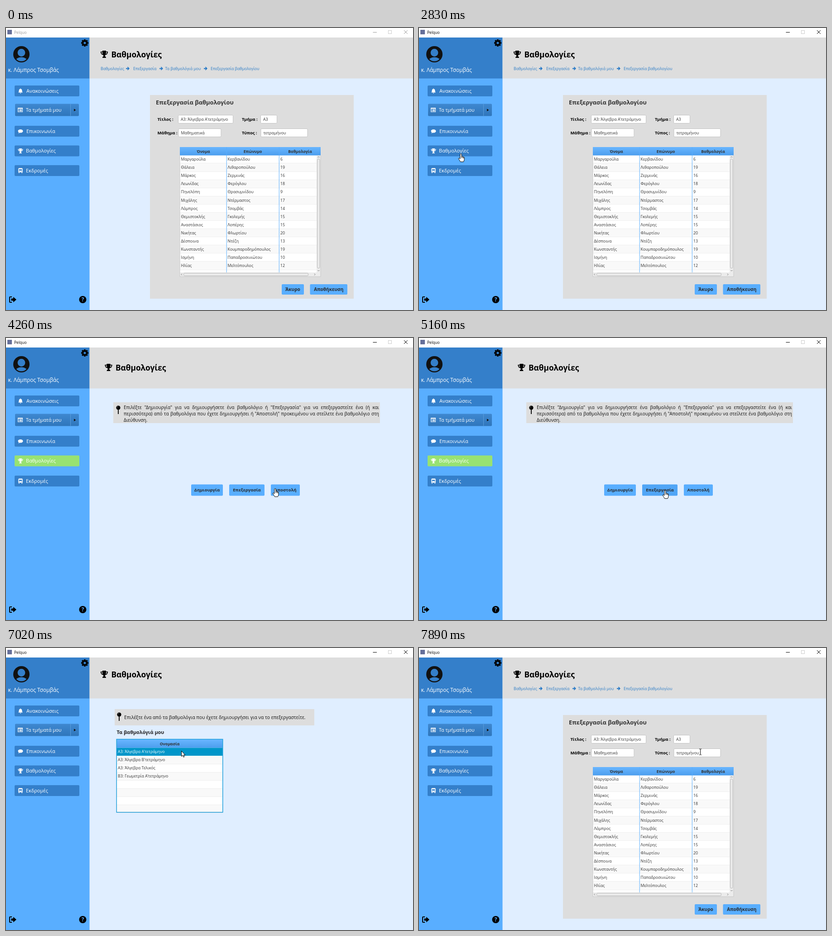
These frames come from a looping animation (899x623 px, 7.99 s). An HTML page with a canvas:

```html
<!DOCTYPE html>
<html lang="el">
<head>
<meta charset="utf-8">
<title>Βαθμολογίες</title>
<style>
html, body { margin: 0; width: 100%; height: 100%; overflow: hidden; background: #e0eeff; }
canvas { display: block; }
</style>
</head>
<body>
<canvas id="stage" width="899" height="623"></canvas>
<script>
const ctx = document.getElementById('stage').getContext('2d');
const LOOP = 7990;
const FONT = '"Open Sans", "Noto Sans", sans-serif';
const BLUE = '#59aeff', DEEP = '#347fca', GREY = '#dddddd', INK = '#333333';

const ICONS = {
  trophy: 'M4 0H12V2H16V4Q15 9 10.6 9.6Q9.5 11 9.5 12.5Q12 13 12 16H4Q4 13 6.5 12.5Q6.5 11 5.4 9.6Q1 9 0 4V2H4ZM1.6 3.5Q2 6.8 4.7 7.8Q4 6 4 3.5ZM14.4 3.5Q14 6.8 11.3 7.8Q12 6 12 3.5Z',
  bell: 'M8 0Q9 0 9 1.5Q13 2.5 13 7Q13 11 15 13H1Q3 11 3 7Q3 2.5 7 1.5Q7 0 8 0ZM6 14H10Q10 16 8 16Q6 16 6 14Z',
  list: 'M0 1H16V15H0ZM1.5 4.5V13.5H14.5V4.5ZM3 6H4.5V7.5H3ZM6 6H13V7.5H6ZM3 8.5H4.5V10H3ZM6 8.5H13V10H6ZM3 11H4.5V12.5H3ZM6 11H13V12.5H6Z',
  comment: 'M8 2C12.5 2 16 4.5 16 7.5S12.5 13 8 13Q6.5 13 5.2 12.6Q3.5 14.5 1 14.5Q2.5 13 2.6 11.4Q0 9.8 0 7.5C0 4.5 3.5 2 8 2Z',
  bus: 'M3 0H13Q15 1 15 4V13H14V16H11.5V13.5H4.5V16H2V13H1V4Q1 1 3 0ZM3 4V8H13V4ZM3 10V12H5.5V10ZM10.5 10V12H13V10Z',
  next: 'M8 1L15 8L8 15L6 13L9 10H1V6H9L6 3Z',
  exit: 'M6 1H2Q0 1 0 3V13Q0 15 2 15H6V13H2V3H6ZM9 2L16 8L9 14V10.5H4.5V5.5H9Z'
};
for (const name in ICONS) ICONS[name] = new Path2D(ICONS[name]);

const ARROW = new Path2D('M.5 .5V12.5L3.2 10L5.1 14.2L7 13.3L5.2 9.3H8.8Z');
const HAND = new Path2D('M-1.6 11.5V1.6Q-1.6 .4 0 .4T1.6 1.6V6.2Q3.5 5.4 4.2 6.9Q5.7 6.4 6.2 7.7Q7.5 7.5 7.5 9V13Q7.3 15.5 5.8 18.2H-1Q-2.5 15-5 11.6Q-5.4 9.8-3.8 9.7Z');
const KNUCKLES = new Path2D('M1.6 6V10M4.2 7V10M6.2 8V10.5');
const BEAM = new Path2D('M-2.5 -6.5H-.8L0 -5.8L.8 -6.5H2.5M0 -5.8V5.8M-2.5 6.5H-.8L0 5.8L.8 6.5H2.5');

const MENU = [
  ['Ανακοινώσεις', 'bell', 45, 127],
  ['Επικοινωνία', 'comment', 45, 216],
  ['Βαθμολογίες', 'trophy', 44, 259.5],
  ['Εκδρομές', 'bus', 44, 303]
];
const ACTIONS = [['Δημιουργία', 409, 70], ['Επεξεργασία', 493, 78], ['Αποστολή', 585, 64]];
const FIELDS = [
  ['Τίτλος :', 334.5, 380, 192, 122, "Α3: Άλγεβρα Α'τετράμηνο"],
  ['Τμήμα :', 521, 562, 192, 37, 'Α3'],
  ['Μάθημα :', 334.5, 380.5, 222, 95, 'Μαθηματικά'],
  ['Τύπος :', 521, 562.5, 222, 104, 'τετραμήνου']
];
const PUPILS = `Μαργαρούλα Κερβανίδου 6
Θάλεια Λιθαροπούλου 19
Μάρκος Ζερμινάς 16
Λεωνίδας Φερόγλου 18
Πηνελόπη Θρασυμνίδου 9
Μιχάλης Ντέρμαστος 17
Λάμπρος Τσομβάς 14
Θεμιστοκλής Γκολεμής 15
Αναστάσιος Λοπέρης 15
Νικήτας Φλωρτίου 20
Δέσποινα Ντέζη 13
Κωνσταντής Κουμπαροδημόπουλος 19
Ισμήνη Παπαδροσινιώτου 10
Ηλίας Μελτόπουλος 12`.split('\n').map(line => line.split(' '));
const BOOKS = ["Α3: Άλγεβρα Α'τετράμηνο", "Α3: Άλγεβρα Β'τετράμηνο", 'Α3: Άλγεβρα Τελικός', "Β3: Γεωμετρία Α'τετράμηνο"];
const HINT = [
  'Επιλέξτε "Δημιουργία" για να δημιουργήσετε ένα βαθμολόγιο ή "Επεξεργασία" για να επεξεργαστείτε ένα (ή και',
  'περισσότερα) από τα βαθμολόγια που έχετε δημιουργήσει ή "Αποστολή" προκειμένου να στείλετε ένα βαθμολόγιο στη',
  'Διεύθυνση.'
];
const ROW = 18.08;

// Pointer moves: first step, last step, step count, end point
const MOVES = [
  [540, 540, 1, 614, 535], [650, 1190, 6, 73, 216], [1300, 1300, 1, 89, 270], [1410, 1410, 1, 92, 277],
  [3600, 4260, 7, 594, 332], [4380, 4380, 1, 607, 334], [4480, 4480, 1, 613, 336], [4590, 5160, 6, 543, 336],
  [5800, 6470, 7, 375, 229], [6580, 6580, 1, 385, 228], [6680, 6680, 1, 387, 227],
  [7350, 7570, 3, 500, 242], [7670, 7890, 3, 621, 230]
];

function rect(x, y, w, h, color) {
  ctx.fillStyle = color;
  ctx.fillRect(x, y, w, h);
}

function box(x, y, w, h, fill, radius = 2, line) {
  ctx.beginPath();
  ctx.roundRect(x, y, w, h, radius);
  ctx.fillStyle = fill;
  ctx.fill();
  if (line) {
    ctx.strokeStyle = line;
    ctx.lineWidth = 1;
    ctx.stroke();
  }
}

function disc(x, y, r, color) {
  ctx.beginPath();
  ctx.arc(x, y, r, 0, Math.PI * 2);
  ctx.fillStyle = color;
  ctx.fill();
}

function line(points, color, width = 1) {
  ctx.beginPath();
  points.forEach(([x, y]) => ctx.lineTo(x, y));
  ctx.strokeStyle = color;
  ctx.lineWidth = width;
  ctx.stroke();
}

function shade(y, h, top, bottom) {
  const g = ctx.createLinearGradient(0, y, 0, y + h);
  g.addColorStop(0, top);
  g.addColorStop(1, bottom);
  return g;
}

// y is the middle of the capitals
function text(str, x, y, size, color = INK, bold = false, align = 'left') {
  ctx.font = `${bold ? 700 : 400} ${size}px ${FONT}`;
  ctx.fillStyle = color;
  ctx.textAlign = align;
  ctx.fillText(str, x, y + size * 0.36);
}

function justified(str, x, y, size, width) {
  ctx.font = `400 ${size}px ${FONT}`;
  const words = str.split(' ');
  const widths = words.map(w => ctx.measureText(w).width);
  const gap = (width - widths.reduce((a, b) => a + b)) / (words.length - 1);
  words.forEach((word, i) => {
    text(word, x, y, size, '#111');
    x += widths[i] + gap;
  });
}

function icon(name, cx, cy, size, color) {
  ctx.save();
  ctx.translate(cx - size / 2, cy - size / 2);
  ctx.scale(size / 16, size / 16);
  ctx.fillStyle = color;
  ctx.fill(ICONS[name], 'evenodd');
  ctx.restore();
}

function button(label, x, y, w, h, size, fill = BLUE) {
  box(x, y, w, h, fill);
  text(label, x + w / 2, y + h / 2, size, '#2b2b2b', true, 'center');
}

function pin(x, y) {
  rect(x - 1, y, 2, 14, '#111');
  disc(x, y, 4.6, '#000');
  disc(x - 1.5, y - 1.7, 1, '#777');
}

function chevron(x, y, dx, dy) {
  line([[x - dx - 2 * dy, y - dy - 2 * dx], [x + dx, y + dy], [x - dx + 2 * dy, y - dy + 2 * dx]], '#777');
}

function gear(x, y) {
  ctx.save();
  ctx.translate(x, y);
  for (let i = 0; i < 8; i++) {
    ctx.rotate(Math.PI / 4);
    rect(-1.8, -8, 3.6, 5, '#000');
  }
  ctx.restore();
  disc(x, y, 6.2, '#000');
  disc(x, y, 2.6, DEEP);
}

function avatar(x, y) {
  disc(x, y, 18, '#111');
  ctx.save();
  ctx.beginPath();
  ctx.arc(x, y, 15.5, 0, Math.PI * 2);
  ctx.clip();
  disc(x, y - 3.5, 8.4, DEEP);
  ctx.beginPath();
  ctx.ellipse(x, y + 17, 14, 10.5, 0, 0, Math.PI * 2);
  ctx.fillStyle = DEEP;
  ctx.fill();
  ctx.restore();
}

function titleBar(active) {
  const ink = active ? '#000' : '#999';
  rect(0, 0, 899, 21, '#fff');
  rect(3, 4, 10, 10, '#66719a');
  text('Pelquo', 18, 9.5, 8.5, ink);
  rect(810.5, 9, 8.5, 1, ink);
  ctx.strokeStyle = '#ccc';
  ctx.lineWidth = 1;
  ctx.strokeRect(844.5, 5.5, 7, 7);
  line([[879, 5], [887, 13]], ink);
  line([[887, 5], [879, 13]], ink);
}

function sidebar(chosen) {
  rect(0, 21, 184.5, 602, BLUE);
  rect(0, 21, 184.5, 90.5, DEEP);
  gear(174, 33);
  avatar(34, 58);
  text('κ. Λάμπρος Τσομβάς', 4.5, 93, 11.8, '#fff');
  MENU.forEach(([label, glyph, x, top], i) => {
    const y = top + (chosen && i === 3 ? 1 : 0);
    box(19, y, 143, 24, chosen && i === 2 ? '#98e272' : DEEP);
    icon(glyph, 32, y + 12, 11, '#fff');
    text(label, x, y + 12, 11, '#fff');
  });
  box(20, 167.5, 141, 27, shade(167, 28, '#3f88d0', '#2f76bb'));
  rect(142, 168, 1, 26, '#5c9edb');
  icon('list', 31.5, 181, 11, '#fff');
  text('Τα τμήματά μου', 44, 181, 10.5, '#fff');
  ctx.fillStyle = '#111';
  ctx.fill(new Path2D('M150 178.5L154.5 181.2L150 184Z'));
  icon('exit', 15, 600, 16, '#000');
  disc(169.5, 600, 8, '#000');
  text('?', 169.5, 600, 12, BLUE, true, 'center');
}

function header(x, y) {
  rect(184.5, 21, 714.5, 90.5, GREY);
  icon('trophy', x, y - 0.5, 16, '#000');
  text('Βαθμολογίες', x + 15.5, y, 17.3, '#000', true);
}

function tableHead(x, y, w, labels) {
  rect(x, y, w, 18.5, shade(y, 18.5, '#69b6ff', '#4c9eee'));
  labels.forEach(([label, cx]) => text(label, cx, y + 9.5, 8.7, INK, true, 'center'));
}

function rows(x, y, w, bottom) {
  for (let i = 0; y + i * ROW < bottom; i++) {
    const top = Math.round(y + i * ROW), end = Math.min(bottom, Math.round(y + (i + 1) * ROW));
    rect(x, top, w, end - top, i % 2 ? '#f9f9f9' : '#fff');
    if (end < bottom) rect(x, end - 1, w, 1, '#efefef');
  }
}

function menuScene(pressed) {
  header(226.5, 65.5);
  rect(237, 142, 589, 46, GREY);
  pin(248, 154);
  justified(HINT[0], 260, 153.5, 10, 564);
  justified(HINT[1], 260, 167.5, 10, 564);
  text(HINT[2], 260, 181.5, 10, '#111');
  ACTIONS.forEach(([label, x, w], i) => button(label, x, 323.5, w, 25, 9.6, pressed && i === 1 ? '#50a5f6' : BLUE));
}

function listScene(selected) {
  header(217, 58.5);
  rect(240, 135, 441, 36, GREY);
  pin(250, 147);
  text('Επιλέξτε ένα από τα βαθμολόγια που έχετε δημιουργήσει για να το επεξεργαστείτε.', 261, 153.5, 10.3, '#111');
  text('Τα βαθμολόγιά μου', 244.5, 186, 10.9, '#222', true);
  rows(244, 220.4, 235, 363);
  tableHead(244, 202, 235, [['Ονομασία', 361.5]]);
  rect(244, 202, 1, 161, '#c4c4c4');
  rect(244, 362.5, 235, 1, '#bbb');
  rect(478, 202, 1, 161, BLUE);
  if (selected) {
    rect(244, 220.5, 235, 17.5, '#0096c9');
    ctx.strokeStyle = '#1a9fdc';
    ctx.lineWidth = 1.4;
    ctx.strokeRect(244.2, 201.5, 234.6, 161.5);
  }
  BOOKS.forEach((book, i) => text(book, 247, 229 + i * ROW, 8.8, selected && !i ? '#fff' : INK));
}

function detailScene() {
  header(217, 58.5);
  [['Βαθμολογίες', 209], ['Επεξεργασία', 281], ['Τα βαθμολόγιά μου', 351.5], ['Επεξεργασία βαθμολογίου', 452]]
    .forEach(([label, x]) => text(label, x, 89.5, 8.7, '#2b7cc7'));
  [269, 343, 441].forEach(x => icon('next', x, 89.5, 9, '#2377c6'));

  rect(318, 148, 450, 450, GREY);
  text('Επεξεργασία βαθμολογίου', 331, 164, 12.9, INK, true);
  FIELDS.forEach(([label, x, left, top, w, value]) => {
    text(label, x, top + 9.5, 9.4, '#000', true);
    box(left + 0.5, top + 0.5, w - 1, 18, '#fff', 2, '#c3c3c3');
    text(value, left + 6, top + 10, 8.9);
  });

  rows(384, 281.4, 302, 540);
  tableHead(384, 263, 311, [['Όνομα', 436], ['Επώνυμο', 545], ['Βαθμολογία', 649.5]]);
  rect(486.7, 263, 1, 277, BLUE);
  rect(602.8, 263, 1, 277, BLUE);
  PUPILS.forEach((cells, row) => cells.forEach((cell, col) =>
    text(cell, [386.5, 489.5, 606][col], 290 + row * ROW, 8.8)));

  rect(686, 281.5, 9, 267.5, '#ececec');
  rect(384, 540, 311, 9, '#ececec');
  box(687.5, 289.5, 5.5, 241, '#eaeaea', 2, '#b8b8b8');
  box(392.5, 541.5, 275, 6, '#eaeaea', 2, '#b8b8b8');
  chevron(690.5, 285, 0, -1);
  chevron(690.5, 536, 0, 1);
  chevron(388, 544.5, -1, 0);
  chevron(682, 544.5, 1, 0);
  line([[384, 281.5], [384, 549.3], [695, 549.3], [695, 281.5]], '#c8c8c8');

  button('Άκυρο', 609, 566, 49, 23, 10.2);
  button('Αποθήκευση', 671.5, 566, 82.5, 23, 10.1);
}

function pointerAt(t) {
  let x = 0, y = 0;
  for (const [start, end, count, toX, toY] of MOVES) {
    if (t < start) break;
    const gap = (end - start) / (count - 1) || 1;
    const u = Math.min(1, Math.floor((t - start) / gap + 1.05) / count);
    const eased = u * u * (3 - 2 * u);
    x += (toX - x) * eased;
    y += (toY - y) * eased;
  }
  return [Math.round(x), Math.round(y)];
}

function pointerKind(x, y, scene, t) {
  const inside = (left, top, w, h) => x >= left && x <= left + w && y >= top && y <= top + h;
  if (MENU.some(item => inside(19, item[3], 143, 24))) return 'hand';
  if (scene === 'menu' && ACTIONS.some(([, left, w]) => inside(left, 323, w, 26))) return 'hand';
  if (t >= 7350 && FIELDS.some(([, , left, top, w]) => inside(left, top, w, 19))) return 'beam';
  return 'arrow';
}

function drawPointer(x, y, kind) {
  ctx.save();
  ctx.translate(x, y);
  ctx.lineWidth = 1;
  ctx.strokeStyle = '#000';
  ctx.fillStyle = '#fff';
  if (kind === 'beam') {
    ctx.translate(0.5, -0.5);
    ctx.stroke(BEAM);
  } else {
    const shape = kind === 'hand' ? HAND : ARROW;
    if (kind === 'hand') ctx.translate(0.5, 0.5);
    ctx.fill(shape);
    ctx.stroke(shape);
    if (kind === 'hand') ctx.stroke(KNUCKLES);
  }
  ctx.restore();
}

function draw(t) {
  const scene = t < 2950 || t >= 7140 ? 'detail' : t < 5370 ? 'menu' : 'list';
  rect(0, 0, 899, 623, '#e0eeff');
  titleBar(t >= 2710);
  sidebar(scene === 'menu');
  if (scene === 'menu') menuScene(t >= 5160);
  else if (scene === 'list') listScene(t >= 6920);
  else detailScene();
  if (t >= 540) {
    const [x, y] = pointerAt(t);
    drawPointer(x, y, pointerKind(x, y, scene, t));
  }
}

function tick() {
  draw(performance.now() % LOOP);
  requestAnimationFrame(tick);
}
tick();
</script>
</body>
</html>
```
